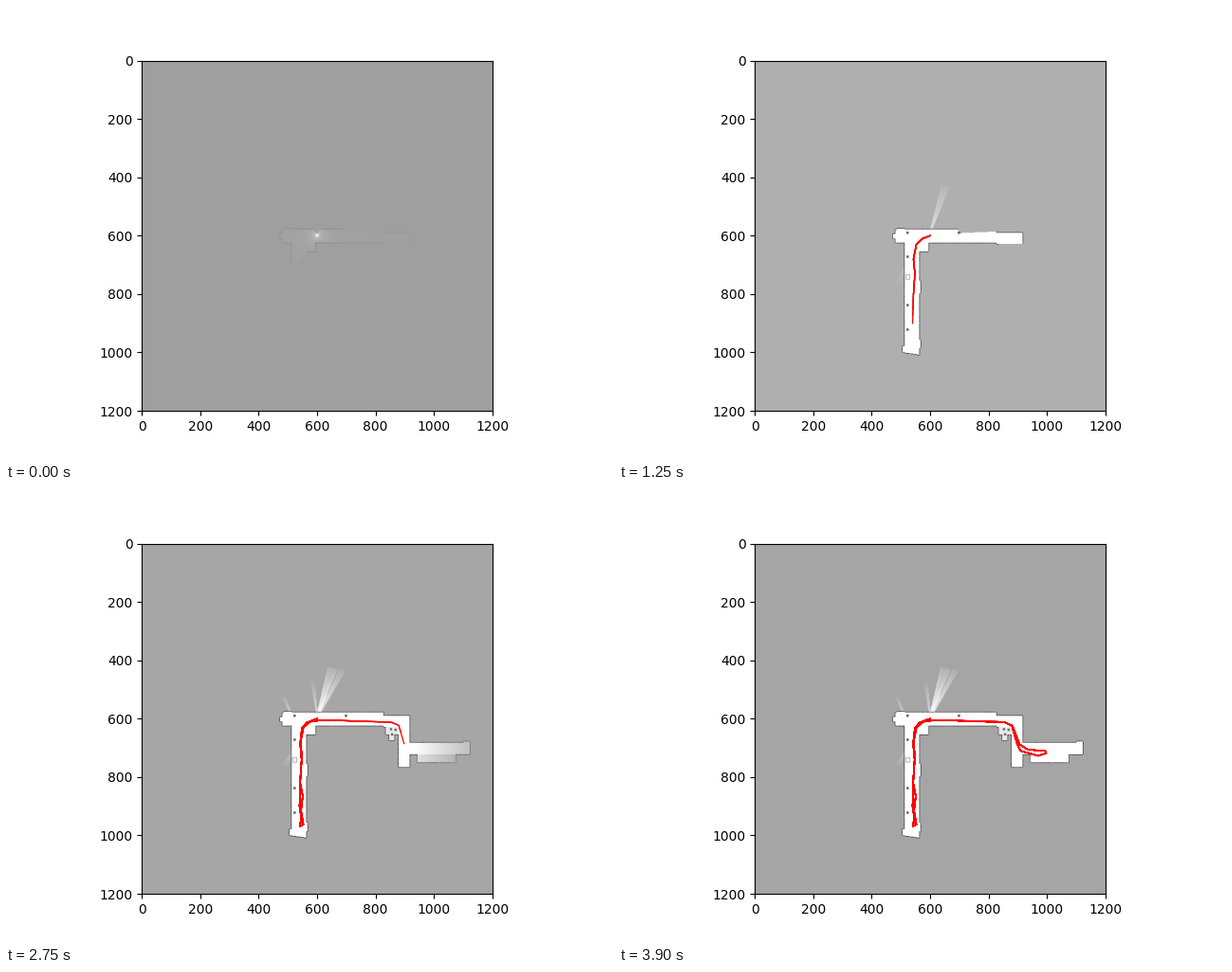
Recreate the animation shown at these times as a matplotlib script. Size 640 px wide and 480 px high, loop 3.95 s.

```python
import numpy as np
import matplotlib.pyplot as plt
from matplotlib.animation import FuncAnimation

FRAMES, STEP = 79, 50
SIDE, CELL = 1201, 2          # map width and grid cell, in map units
START = (600, 600)
DRIVE = 600                   # time when the robot sets off

rng = np.random.default_rng(4)
axis = np.arange(0, SIDE, CELL) + 0.5
X, Y = np.meshgrid(axis, axis)
DIST = np.hypot(X - START[0], Y - START[1])
ROUGH = rng.uniform(0.6, 1, X.shape)
STREAKS = rng.uniform(0.7, 1.1, 90)


def ramp(t, t0, t1):
    return np.clip((t - t0) / (t1 - t0), 0, 1)


def box(x0, y0, x1, y1):
    return (X >= x0) & (X < x1) & (Y >= y0) & (Y < y1)


def beam(x0, y0, angle, spread, length):
    """Fading ray; angle in degrees clockwise from straight up."""
    a, dx, dy = np.radians(angle), X - x0, Y - y0
    along = dx * np.sin(a) - dy * np.cos(a)
    across = np.abs(dx * np.cos(a) + dy * np.sin(a))
    inside = (along > 0) & (along < length)
    inside &= across < 3 + along * np.tan(np.radians(spread))
    bearing = np.degrees(np.arctan2(dx, -dy)) % 90
    streak = STREAKS[bearing.astype(int)]
    return inside * streak * (1.15 - along / length)


# Rooms
step = box(514, 626, 595, 656)
hall = (box(482, 580, 828, 626) | box(828, 592, 917, 630) | step
        | box(474, 596, 482, 612) | box(487, 577, 513, 580))
shaft = (box(514, 626, 564, 1000) | box(564, 756, 568, 800)
         | box(564, 958, 568, 987)
         | box(506, 980, 564, 1010) & (Y < 1001 + 0.15 * (X - 506)))
lobby = box(880, 592, 917, 767)
alcove = box(835, 626, 880, 655) | box(848, 655, 866, 676)
arm = (box(917, 684, 1124, 724) | box(1102, 680, 1124, 684)
       | box(944, 724, 1076, 752))
solid = hall | shaft | lobby | alcove | arm

# Parts of the rooms that the first scans see or miss
glimpse = shaft & (Y < 656 + 1.25 * (564 - X)) & (Y < 705)
notch = np.abs(X - 600) < 0.65 * (596 - Y)
sliver = hall & (X > 698) & (X < 828) & (Y < 593 - 0.045 * (X - 698))

# Open-air rays with the time each one starts to show
rays = [
    (0.55 * beam(602, 588, 18, 4, 165), 100),
    (0.95 * beam(602, 588, 18, 5, 168), 1700),
    (0.80 * beam(606, 588, 28, 2.5, 172), 1700),
    (0.50 * beam(600, 588, -7, 2, 110), 2250),
    (0.45 * beam(510, 582, -24, 3, 60), 1700),
    (0.30 * beam(520, 710, 211, 5, 60), 900),
]

posts = [(524, 591 + 83 * i) for i in range(5) if i != 2] + [(700, 591)]
clutter = [(853, 637), (869, 640), (857, 656)]
crate = box(517, 734, 532, 752) & ~box(519, 736, 530, 750)


def dot(x, y):
    return box(x - 4, y - 4, x + 4, y + 4)


def grid_map(t):
    bg = np.interp(t, [0, 50, 1250, 2800, 3150, 3300],
                   [159, 178, 175, 166, 187, 165])

    # first scans: brightness falls off with distance, then saturates
    gain = np.interp(t, [0, 50, DRIVE], [0.06, 1, 6.5])
    near = np.minimum(1, gain * 45 / np.maximum(DIST, 2))
    near = np.maximum(near, ramp(t, 2300, 2550))
    level = near * (hall | glimpse)
    level[notch] *= ramp(t, 50, 500)
    level[sliver] *= ramp(t, 2250, 2450)

    # later rooms open up as the robot comes near
    down = 650 + (Y - 626) * 0.8
    right = 2540 + (X - 917) * 0.75 + 60 * (Y > 724)
    for room, t0, span in [(shaft, down, 220), (lobby, 2400, 220),
                           (0.75 * alcove, 2350, 300), (arm, right, 200)]:
        level = np.maximum(level, room * ramp(t, t0, t0 + span))

    # walls surround whatever has been seen
    edge = np.max([np.roll(level, d, ax) for ax in (0, 1) for d in (-1, 1)],
                  axis=0)
    edge = np.sqrt(edge) * ~solid * ROUGH

    for ray, t0 in rays:
        level = np.maximum(level, ray * ramp(t, t0, t0 + 500))

    img = (bg + (255 - bg) * np.minimum(level, 1)) * (1 - 0.95 * edge)
    for x, y in posts:
        if t >= 100 + 2.6 * max(0, y - 591):
            img[dot(x, y)] = 95
    if t >= 2500:
        for x, y in clutter:
            img[dot(x, y)] = 110
    if t >= 900:
        img[crate] = 140
    return img


# Each leg of the drive: time of arrival and its key points
LEGS = [
    (1250, [(575, 609), (553, 630), (543, 680), (548, 730), (543, 800),
            (540, 900)]),
    (1450, [(546, 940), (541, 968)]),
    (2200, [(553, 962), (545, 915), (551, 865), (542, 820), (547, 740),
            (542, 685)]),
    (2750, [(548, 632), (565, 612), (620, 604), (855, 612), (880, 623),
            (898, 685)]),
    (2980, [(910, 710), (970, 727), (998, 718)]),
    (3150, [(994, 710), (935, 706), (907, 688)]),
    (3900, [(883, 626), (855, 611), (620, 604), (588, 606)]),
]


def schedule():
    pts, times = [START], [DRIVE]
    for end, leg in LEGS:
        hops = np.diff(np.array([pts[-1]] + leg), axis=0)
        s = np.cumsum(np.hypot(*hops.T))
        times.extend(times[-1] + (end - times[-1]) * s / s[-1])
        pts += leg
    return np.array(times), np.array(pts)


times, route = schedule()


def trail(t):
    when = np.append(times[times < t], t)
    return [np.interp(when, times, route[:, i]) for i in (0, 1)]


fig, ax = plt.subplots(figsize=(6.4, 4.8), dpi=100)
im = ax.imshow(grid_map(0), cmap="gray", vmin=0, vmax=255,
               extent=(-0.5, SIDE - 0.5, SIDE - 0.5, -0.5))
# overlapping trails make the older stretches bolder
lines = {n: ax.plot(*trail(n * STEP), color="red", lw=0.9)[0]
         for n in range(FRAMES) if n * STEP > DRIVE}
ax.set_xlim(-0.5, SIDE - 0.5)
ax.set_ylim(SIDE - 0.5, -0.5)


def update(n):
    im.set_data(grid_map(n * STEP))
    for k, line in lines.items():
        line.set_visible(k <= n)
    return [im, *lines.values()]


anim = FuncAnimation(fig, update, frames=FRAMES, interval=STEP,
                     init_func=lambda: update(0), repeat=True, repeat_delay=0)
plt.show()
```
